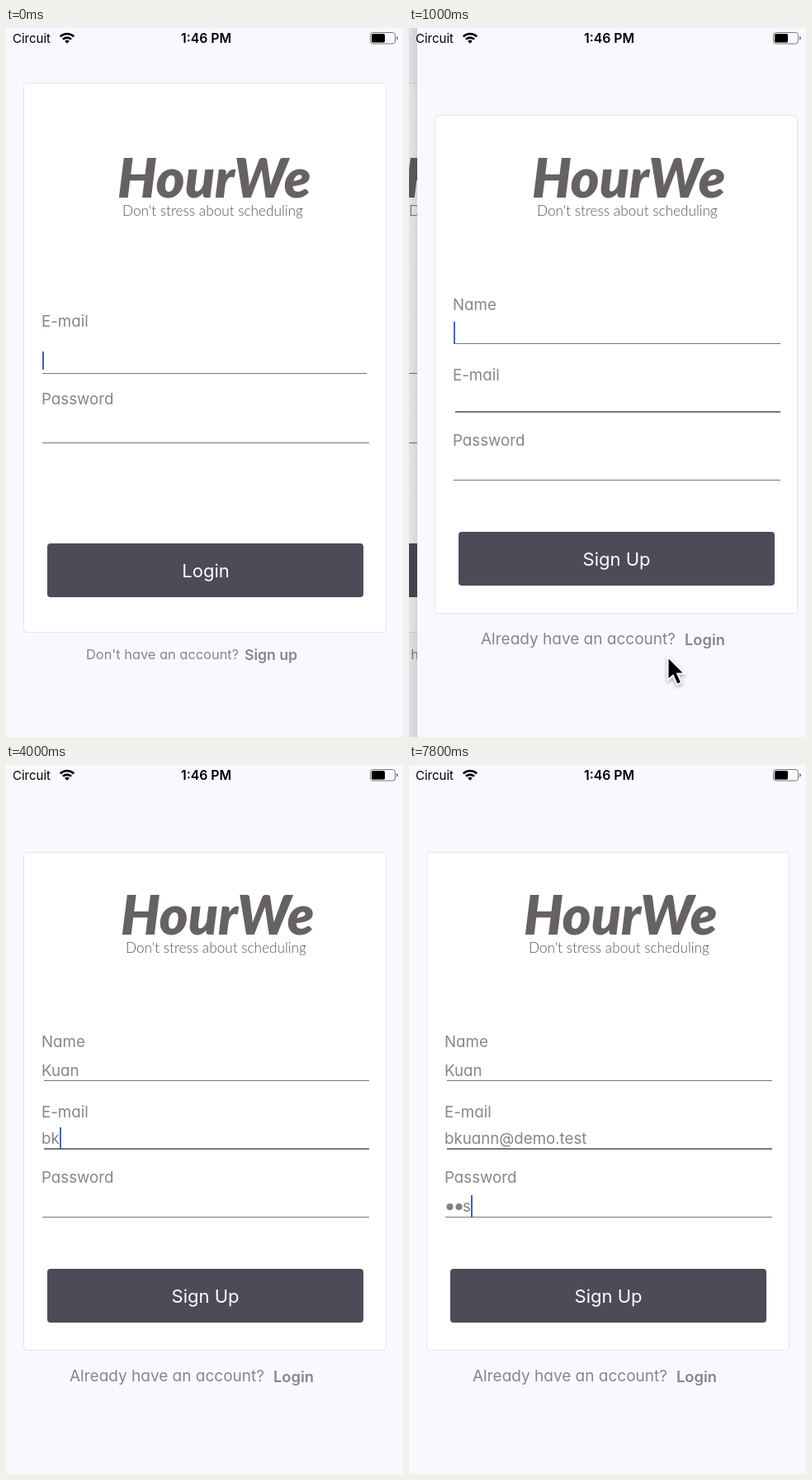
These frames come from a looping animation (481x857 px, 8 s). An HTML page:

```html
<!DOCTYPE html>
<html lang="en">
<head>
<meta charset="utf-8">
<title>Sign up flow</title>
<style>
html, body { margin: 0; width: 100%; height: 100%; overflow: hidden; background: #f8f9ff; }
svg { display: block; width: 481px; height: 857px; }
text { font: 18.7px Inter, sans-serif; font-feature-settings: "cv11"; fill: #868686; white-space: pre; }
.small { font-size: 16.4px; }
.link { font-size: 18.3px; font-weight: 600; font-feature-settings: normal; }
.btn { font-size: 22px; fill: #fff; text-anchor: middle; font-feature-settings: normal; }
.brand { font: italic 900 66px Lato, sans-serif; fill: #666264; }
.tag { font: 300 17.2px Lato, sans-serif; fill: #555; }
.status { font-size: 15px; fill: #000; font-feature-settings: normal; }
.clock { font-size: 15.8px; font-weight: 600; }
.card { fill: #fff; stroke: #dce5f2; }
.button { fill: #4e4b58; }
.line { stroke: #777; }
.caret { fill: #4060a8; }
</style>
</head>
<body>
<svg viewBox="0 0 481 857">
  <defs>
    <linearGradient id="fade">
      <stop offset="0" stop-color="#445" stop-opacity="0"/>
      <stop offset="1" stop-color="#445" stop-opacity=".09"/>
    </linearGradient>
    <g id="brand">
      <text class="brand" y="205">HourWe</text>
      <text class="tag" x="6" y="227">Don't stress about scheduling</text>
    </g>
  </defs>

  <g id="login">
    <rect width="481" height="857" fill="#f8f9ff"/>
    <rect class="card" x="21.5" y="66.5" width="439" height="664" rx="4"/>
    <use href="#brand" x="135"/>
    <text x="43" y="361">E-mail</text>
    <path class="line" d="M44 417.5H437M44 501.5H440"/>
    <rect class="caret" x="44" y="391" width="2" height="22"/>
    <text x="43" y="455">Password</text>
    <rect class="button" x="50" y="623" width="383" height="65" rx="4"/>
    <text class="btn" x="242" y="664">Login</text>
    <text class="small" x="97" y="763">Don't have an account?</text>
    <text class="link" id="link" x="289" y="764" style="font-size:17.6px">Sign up</text>
  </g>
  <rect id="dim" width="481" height="857"/>

  <g id="signup">
    <rect x="-8" width="8" height="857" fill="url(#fade)"/>
    <rect width="481" height="857" fill="#f8f9ff"/>
    <rect class="card" x="21.5" y="105.5" width="439" height="602" rx="4"/>
    <use href="#brand" x="139"/>
    <text x="43" y="341">Name</text>
    <text x="43" y="426">E-mail</text>
    <text x="43" y="505">Password</text>
    <path class="line" d="M46 381.5H440M44 546.5H440"/>
    <path class="line" stroke-width="2" d="M46 464H440"/>
    <text id="name" x="43" y="376"></text>
    <text id="mail" x="43" y="458"></text>
    <g id="dots" fill="#808080">
      <circle cx="49.5" cy="534" r="4"/>
      <circle cx="60.5" cy="534" r="4"/>
    </g>
    <text id="key" y="540"></text>
    <rect class="caret" id="caret" width="2" height="27"/>
    <rect class="button" x="50" y="609" width="383" height="65" rx="4"/>
    <text class="btn" x="241.5" y="650">Sign Up</text>
    <text x="77" y="745" style="font-size:19px">Already have an account?</text>
    <text class="link" x="324" y="746">Login</text>
  </g>

  <text class="status" x="8" y="18">Circuit</text>
  <text class="status clock" x="212" y="18">1:46 PM</text>
  <g fill="none" stroke="#000" stroke-width="2.6">
    <path d="M65.8 10.4a11.6 11.6 0 0 1 16.4 0M68.9 13.7a7.2 7.2 0 0 1 10.2 0"/>
    <path d="M74 18.8l-2.8-2.9a4 4 0 0 1 5.6 0z" fill="#000" stroke="none"/>
  </g>
  <rect x="441.5" y="5.5" width="30" height="13.5" rx="3" fill="none" stroke="#777"/>
  <rect x="443" y="7" width="16" height="10.5" rx="1.5"/>
  <path d="M473 10q2 .5 2 2.3t-2 2.3z" fill="#777"/>

  <path id="mouse" d="M313.5 760v28.5l6.3-5.8 5 11 5.4-2.4-4.9-10.8h8.7z"
    stroke="#fff" stroke-width="2" style="filter:drop-shadow(0 2px 2px #0005)"/>
</svg>
<script>
const LOOP = 8000, STEP = 200, WIDTH = 481, LEFT = 43, DOT = 11;
const NAME = "Kuan", MAIL = "bkuann@demo.test", PASS = "pas";
const $ = id => document.getElementById(id);
const shift = (id, x, y = 0) => $(id).setAttribute("transform", `translate(${x} ${y})`);
const show = (el, on) => el.style.display = on ? "" : "none";

function mailCount(t) {
  if (t < 3400) return 0;
  if (t < 4000) return 1;
  if (t < 5400) return Math.min(7, 2 + (t - 4000) / STEP);
  return Math.min(16, 7 + Math.ceil((t - 5200) / STEP * 1.5));
}

// Critically damped push from the right
function remaining(t) {
  const u = Math.max(0, t - 698) * 0.0191;
  return t < 1400 ? (1 + u) * Math.exp(-u) : 0;
}

function draw(t) {
  const rest = remaining(t);
  shift("signup", Math.round(rest * WIDTH));
  show($("signup"), rest < 1);
  shift("login", Math.round(-0.3 * WIDTH * (1 - rest)));
  $("dim").style.opacity = 0.115 * (1 - rest);
  $("link").style.opacity = t >= 400 && t < 800 ? 0.4 : 1;

  show($("mouse"), t >= 200 && t < 1600);
  shift("mouse", 0, t < 400 ? 12 : 0);

  $("name").textContent = NAME.slice(0, Math.max(0, (t - 1400) / STEP));
  $("mail").textContent = MAIL.slice(0, mailCount(t));
  const keys = [7200, 7600, 7800].filter(at => t >= at).length;
  const hidden = Math.max(0, keys - 1);
  [...$("dots").children].forEach((dot, i) => show(dot, i < hidden));
  $("key").textContent = PASS.slice(hidden, keys);
  $("key").setAttribute("x", LEFT + hidden * DOT);

  const [field, y, indent] = t < 2800 ? ["name", 355, 0]
    : t < 6600 ? ["mail", 438, 0] : ["key", 520, hidden * DOT];
  const caret = $("caret"), typed = $(field);
  const width = typed.textContent ? typed.getComputedTextLength() : 1;
  caret.setAttribute("x", Math.round(LEFT + indent + width));
  caret.setAttribute("y", y);
  const bright = t >= 1000 && t < 2800 || t >= 3000 && t < 6600;
  caret.style.fill = bright ? "#3f66d8" : "#4060a8";
}

const start = performance.now();
function tick() {
  const t = (performance.now() - start) % LOOP;
  draw(Math.floor(t / STEP) * STEP);
  requestAnimationFrame(tick);
}
tick();
</script>
</body>
</html>
```
